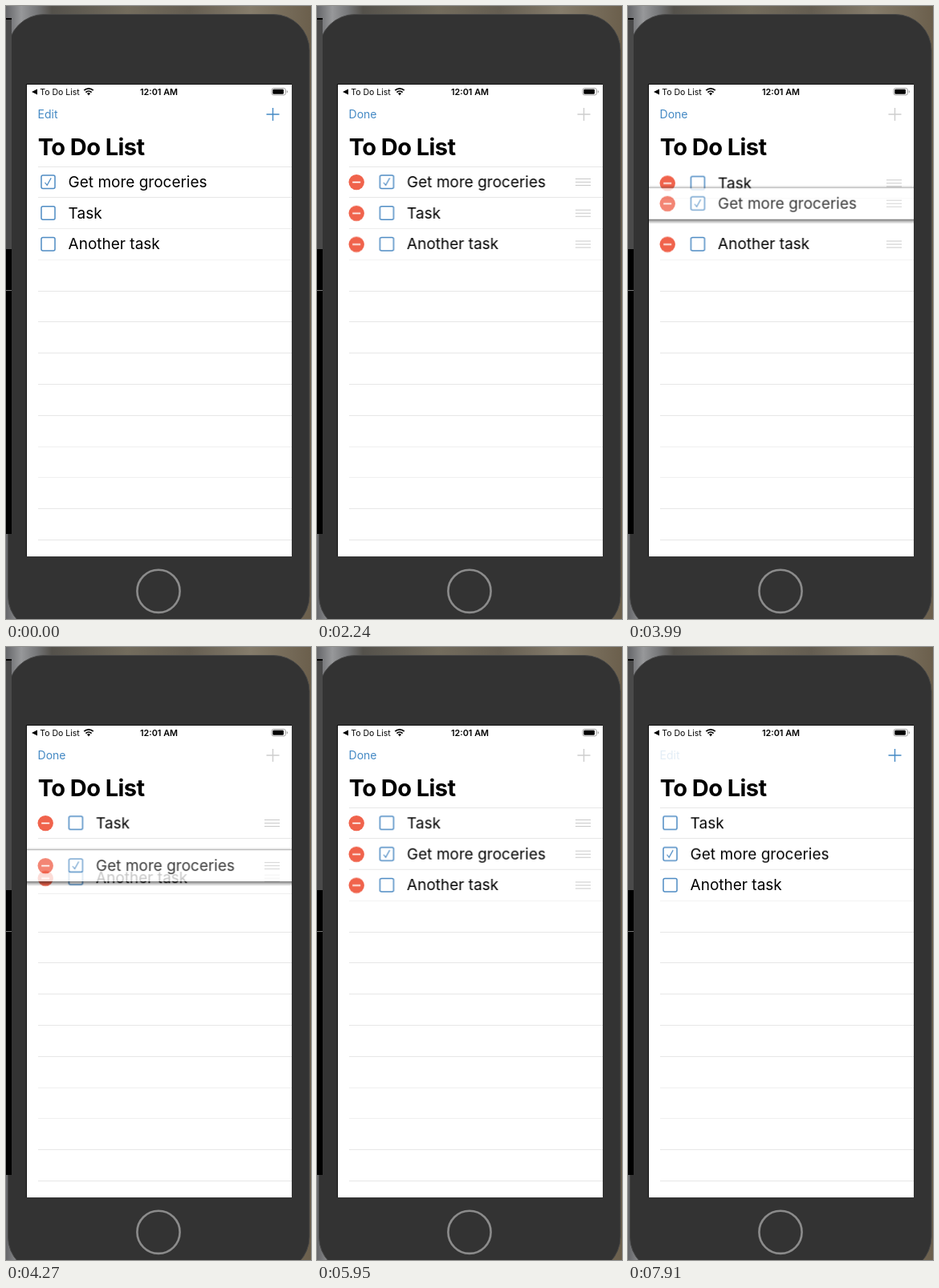
Animation of 380x764 px, one loop 8000 ms. Source, as an HTML page:

```html
<!DOCTYPE html>
<html lang="en">
<head>
<meta charset="utf-8">
<title>To do list reordering</title>
<style>
  html, body { margin: 0; width: 100%; height: 100%; overflow: hidden; background: #333; }
  svg { display: block; width: 100%; height: 100%; font-family: Inter, "Liberation Sans", sans-serif; }
  .row text { font-size: 19px; }
  .nav text { font-size: 14px; fill: #4489c4; }
  .line { stroke: #e7e7e7; fill: none; shape-rendering: crispEdges; }
  .box { fill: none; stroke: #4f8cc4; stroke-width: 1.5; }
  .tick { fill: none; stroke: #4f8cc4; stroke-width: 1.2; }

  /* 1% of the loop = 80 ms */
  .anim, .shift, .del, .grip { animation: 8s linear infinite; }
  .shift { animation-name: shift; }
  .del { animation-name: del; }
  .grip { animation-name: grip; }
  #edit { animation-name: edit; }
  #done { animation-name: done; }
  #plus { animation-name: plus; }
  #task { animation-name: task; }
  #other { animation-name: other; }
  #first { animation-name: drag; }
  #card { animation-name: fade; }
  #lift { animation-name: lift; }
  #above { animation-name: above; }
  #rule { animation-name: rule; }
  #top { animation-name: top; }

  /* entering and leaving edit mode */
  @keyframes shift {
    0%, 19.25% { transform: none; animation-timing-function: ease-in-out; }
    24.875%, 86% { transform: translateX(34.4px); animation-timing-function: ease-in-out; }
    90.9%, 100% { transform: none; }
  }
  @keyframes del {
    0%, 19.25% { transform: translateX(-34.4px); opacity: 0; animation-timing-function: ease-in-out; }
    24.875%, 86% { transform: none; opacity: 1; animation-timing-function: ease-in-out; }
    90.9%, 100% { transform: translateX(-34.4px); opacity: 0; }
  }
  @keyframes grip {
    0%, 19.25% { transform: translateX(24px); opacity: 0; animation-timing-function: ease-in-out; }
    24.875%, 86% { transform: none; opacity: 1; animation-timing-function: ease-in-out; }
    90.9%, 100% { transform: translateX(24px); opacity: 0; }
  }
  @keyframes edit {
    0%, 16.25% { opacity: 1; }
    18%, 19.2% { opacity: .2; }
    19.25%, 86% { opacity: 0; }
    90%, 96.75% { opacity: 1; }
    98.5%, 100% { opacity: .15; }
  }
  @keyframes done {
    0%, 19.25% { opacity: 0; }
    22.5%, 84.5% { opacity: 1; }
    85.75%, 85.95% { opacity: .2; }
    86%, 100% { opacity: 0; }
  }
  @keyframes plus {
    0%, 19.25% { stroke: #4489c4; }
    19.5%, 86% { stroke: #cdcdcd; }
    86.5%, 100% { stroke: #4489c4; }
  }

  /* reordering */
  @keyframes drag {
    0%, 46.25% { transform: none; animation-timing-function: ease-in; }
    49% { transform: translateY(20px); }
    53.375% { transform: translateY(53px); animation-timing-function: ease-out; }
    55.375% { transform: translateY(62px); animation-timing-function: ease-in; }
    57.5% { transform: translateY(48px); animation-timing-function: ease-out; }
    60.375%, 61% { transform: translateY(32px); animation-timing-function: ease-out; }
    63.25%, 100% { transform: translateY(38.75px); }
  }
  @keyframes task {
    0%, 47.5% { transform: none; animation-timing-function: ease-in-out; }
    50.25%, 100% { transform: translateY(-38.75px); }
  }
  @keyframes other {
    0%, 52.56% { transform: none; animation-timing-function: ease-in-out; }
    55.06%, 56% { transform: translateY(-38.75px); animation-timing-function: ease-in-out; }
    58.6%, 100% { transform: none; }
  }
  @keyframes fade {
    0%, 42.5% { opacity: 1; }
    45%, 62.5% { opacity: .78; }
    65%, 100% { opacity: 1; }
  }
  @keyframes lift {
    0%, 42.5% { opacity: 0; }
    45%, 62.5% { opacity: 1; }
    65%, 100% { opacity: 0; }
  }
  @keyframes above {
    0%, 46.5% { opacity: 0; }
    48%, 62.5% { opacity: 1; }
    65%, 100% { opacity: 0; }
  }
  @keyframes rule {
    0%, 42.5% { opacity: 1; }
    43.5%, 63.5% { opacity: 0; }
    65%, 100% { opacity: 1; }
  }
  @keyframes top {
    0%, 42.5% { opacity: 1; }
    43.5%, 64% { opacity: 0; }
    65%, 100% { opacity: 1; }
  }
</style>
</head>
<body>
<svg viewBox="0 0 380 764">
  <defs>
    <linearGradient id="wall">
      <stop offset="0" stop-color="#66676a"/>
      <stop offset=".05" stop-color="#97989a"/>
      <stop offset=".1" stop-color="#77787a"/>
      <stop offset=".15" stop-color="#54514b"/>
      <stop offset=".4" stop-color="#736c5d"/>
      <stop offset=".6" stop-color="#645d51"/>
      <stop offset=".8" stop-color="#857c6b"/>
      <stop offset="1" stop-color="#6b5f4c"/>
    </linearGradient>
    <linearGradient id="below" x2="0" y2="1">
      <stop offset="0" stop-color="#000" stop-opacity=".72"/>
      <stop offset=".35" stop-color="#000" stop-opacity=".4"/>
      <stop offset="1" stop-color="#000" stop-opacity="0"/>
    </linearGradient>
    <clipPath id="screen"><path d="M26 98h330v588h-330z"/></clipPath>

    <rect id="box" class="box" x="44" y="211" width="17" height="16.5" rx="2"/>
    <path id="tick" class="tick" d="M48.5 220l2.7 3.4 5-9"/>
    <g id="minus">
      <circle cx="49.2" cy="219.6" r="9.7" fill="#f0634c"/>
      <path d="M44.2 219.6h10" stroke="#fff" stroke-width="1.7"/>
    </g>
    <path id="bars" d="M322 215.5h19m-19 4h19m-19 4h19" stroke="#c9c9c9" fill="none"/>
    <path id="sep" class="line" d="M40 238.6h316"/>
  </defs>

  <!-- desktop, device, neighbouring window -->
  <path fill="url(#wall)" d="M0 0h380v764H0z"/>
  <rect x="2.5" y="10.5" width="375.5" height="769.5" rx="45" fill="#333" stroke="#464646"/>
  <path fill="#4a4a4a" d="M0 16h7v287H0z"/>
  <path d="M0 15h7v2H0zM0 303h7v355H0z"/>
  <path fill="#777" d="M0 354h7v1H0z"/>
  <circle cx="190" cy="729.3" r="26.6" fill="none" stroke="#8b8b8b" stroke-width="2.6"/>
  <path d="M25 97h331v589H25z" fill="#111"/>
  <path d="M26 98h330v588H26z" fill="#fff"/>

  <g clip-path="url(#screen)">
    <!-- status bar -->
    <path d="M32 107l7-3.5v7z"/>
    <text x="42.3" y="110.8" font-size="10.5">To Do List</text>
    <path d="M97.3 105.2a8 8 0 0 1 11.4 0M99.4 107.6a5.2 5.2 0 0 1 7.2 0" fill="none" stroke="#000" stroke-width="1.7"/>
    <path d="M103 111.4l-2-2.3a2.8 2.8 0 0 1 4 0z"/>
    <text x="190.5" y="110.8" font-size="10.8" font-weight="600" text-anchor="middle">12:01 AM</text>
    <rect x="331" y="102.5" width="17.5" height="8.5" rx="2.4" fill="none" stroke="#a5a5a5"/>
    <rect x="332.3" y="103.8" width="13.6" height="5.9" rx="1.2"/>
    <path d="M349.8 105v3.6q1.4-.5 1.4-1.8t-1.4-1.8z" fill="#a5a5a5"/>

    <!-- navigation -->
    <g class="nav">
      <text id="edit" class="anim" x="39.6" y="140.2">Edit</text>
      <text id="done" class="anim" x="39.6" y="140.2">Done</text>
    </g>
    <path id="plus" class="anim" d="M324.5 135h16m-8-8v16" fill="none" stroke-width="1.4"/>
    <text x="39.8" y="186.3" font-size="29" font-weight="700" letter-spacing="-.58">To Do List</text>

    <!-- list -->
    <path id="top" class="line anim" d="M40 200.5h316"/>
    <path class="line" d="M40 355.5h316m-316 38h316m-316 39h316m-316 39h316m-316 39h316m-316 116h316m-316 39h316"/>
    <path class="line" style="stroke:#f0f0f0" d="M40 549.5h316m-316 38h316"/>

    <g transform="translate(0 38.75)">
      <g id="task" class="row anim">
        <use href="#sep"/>
        <use class="del" href="#minus"/>
        <g class="shift"><use href="#box"/><text x="77.6" y="225.9">Task</text></g>
        <use class="grip" href="#bars"/>
      </g>
    </g>
    <g transform="translate(0 77.5)">
      <g id="other" class="row anim">
        <use href="#sep"/>
        <use class="del" href="#minus"/>
        <g class="shift"><use href="#box"/><text x="77.6" y="225.9">Another task</text></g>
        <use class="grip" href="#bars"/>
      </g>
    </g>
    <g id="first" class="row anim">
      <g id="card" class="anim">
        <g id="above" class="anim">
          <path d="M25 197.5h331v2H25z" opacity=".12"/>
          <path d="M25 199.3h331v1.2H25z" opacity=".45"/>
        </g>
        <g id="lift" class="anim">
          <path d="M25 200.3h331v38.7H25z" fill="#fff"/>
          <path d="M25 239h331v6H25z" fill="url(#below)"/>
        </g>
        <g id="rule" class="anim"><use href="#sep"/></g>
        <use class="del" href="#minus"/>
        <g class="shift">
          <use href="#box"/><use href="#tick"/>
          <text x="77.6" y="225.9">Get more groceries</text>
        </g>
        <use class="grip" href="#bars"/>
      </g>
    </g>
  </g>
</svg>
</body>
</html>
```
